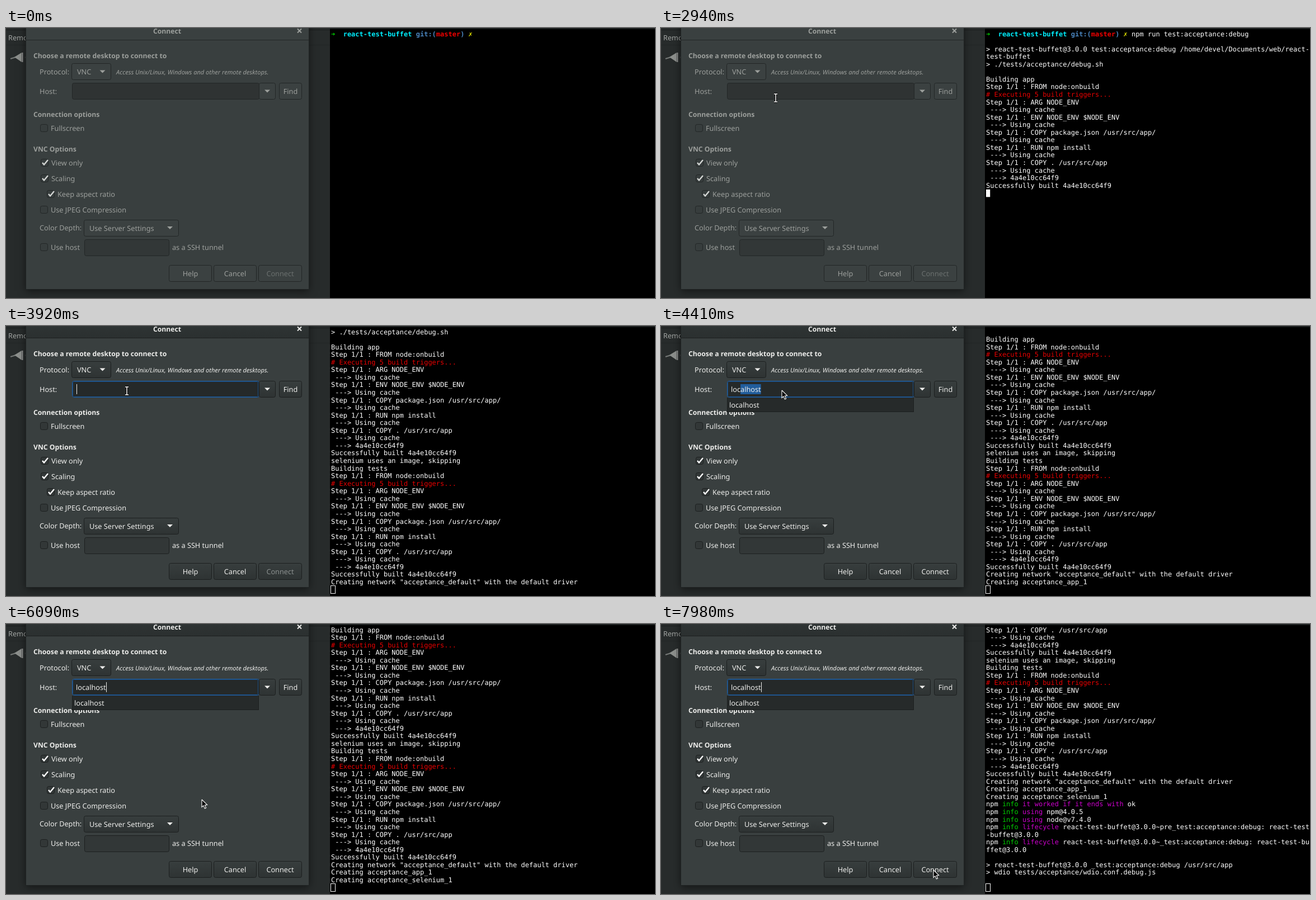
An HTML page with a canvas for the animation above (8 s loop, 1160 px wide and 483 px high).

```html
<!DOCTYPE html>
<html lang="en">
<head>
<meta charset="utf-8">
<title>Remote desktop debugging</title>
<style>
  html, body { margin: 0; width: 100%; height: 100%; overflow: hidden; background: #000; }
  canvas { display: block; }
</style>
</head>
<body>
<canvas id="stage" width="1160" height="483"></canvas>
<script>
const ctx = document.getElementById("stage").getContext("2d");
ctx.textRendering = "geometricPrecision";

const LOOP = 8000, TICK = 70;
const UI = "12.7px 'Noto Sans', sans-serif";
const UI_BOLD = "bold 12.2px 'Noto Sans', sans-serif";
const UI_ITALIC = "italic 11px 'Noto Sans', sans-serif";
const MONO = "12px 'DejaVu Sans Mono', monospace";

// Piecewise linear value over time; keys are [time, value].
function track(t, keys) {
  let i = 0;
  while (i < keys.length - 2 && t >= keys[i + 1][0]) i++;
  const [t0, a] = keys[i], [t1, b] = keys[i + 1];
  return a + (b - a) * Math.min(1, Math.max(0, (t - t0) / (t1 - t0)));
}
const between = (t, a, b) => t >= a && t < b;

// ---------- Terminal ----------
const CELL = 7.224, ROW = 13.56, LEFT = 581, TOP = 4, LAST_ROW = 34;
// A section sign plus a letter switches colour; capitals are bold.
const INK = { w: "#fff", g: "#00cd00", m: "#cd00cd", r: "#e80000", d: "#555",
              G: "#00cd00", C: "#00f0ff", B: "#4a86c0", R: "#f00000", Y: "#e8e800" };

const PROMPT = "§G➜  §Creact-test-buffet §Bgit:(§Rmaster§B) §Y✗ §w";
const COMMAND = "npm run test:acceptance:debug";
const progress = node => `[§d${".".repeat(18)}§w] - : §ginfo §musing §wnode@${node}`;
const cached = step => ["Step 1/1 : " + step, " ---> Using cache"];
const BUILD = [
  "Step 1/1 : FROM node:onbuild",
  "§r# Executing 5 build triggers...",
  ...["ARG NODE_ENV", "ENV NODE_ENV $NODE_ENV", "COPY package.json /usr/src/app/",
      "RUN npm install", "COPY . /usr/src/app"].flatMap(cached),
  " ---> 4a4e10cc64f9",
  "Successfully built 4a4e10cc64f9"
];
const LINES = [
  PROMPT + COMMAND,
  "",
  "> react-test-buffet@3.0.0 test:acceptance:debug /home/devel/Documents/web/react-",
  "test-buffet",
  "> ./tests/acceptance/debug.sh",
  "",
  "Building app", ...BUILD,
  "selenium uses an image, skipping",
  "Building tests", ...BUILD,
  'Creating network "acceptance_default" with the default driver',
  "Creating acceptance_app_1",
  "Creating acceptance_selenium_1",
  "npm §ginfo §mit worked if it ends with §wok",
  "npm §ginfo §musing §wnpm@4.0.5",
  "npm §ginfo §musing §wnode@v7.4.0",
  "npm §ginfo §mlifecycle §wreact-test-buffet@3.0.0~pre_test:acceptance:debug: react-test",
  "-buffet@3.0.0",
  "npm §ginfo §mlifecycle §wreact-test-buffet@3.0.0~_test:acceptance:debug: react-test-bu",
  "ffet@3.0.0",
  "",
  "> react-test-buffet@3.0.0 _test:acceptance:debug /usr/src/app",
  "> wdio tests/acceptance/wdio.conf.debug.js",
  ""
];
const LINE_COUNT = [
  [0, 1], [1960, 1], [2030, 6], [2240, 6], [3010, 22], [3220, 22], [3570, 37],
  [3850, 37], [3920, 38], [3990, 38], [4060, 39], [4480, 39], [4550, 40],
  [6580, 40], [6650, 43], [7210, 43], [7280, 47], [7350, 51]
];

function drawLine(line, row) {
  let col = 0;
  ("w" + line).split("§").filter(part => part.length > 1).forEach(part => {
    const code = part[0];
    ctx.fillStyle = INK[code];
    ctx.font = (code < "a" ? "bold " : "") + MONO;
    for (const char of part.slice(1)) {
      if (char !== " ") ctx.fillText(char, LEFT + col * CELL, TOP + 10.5 + row * ROW);
      col++;
    }
  });
}

function drawTerminal(t) {
  ctx.fillStyle = "#000";
  ctx.fillRect(579, 0, 581, 483);
  ctx.fillStyle = "#1d2020";
  ctx.fillRect(579, 0, 581, 2);

  const count = Math.round(track(t, LINE_COUNT));
  const scroll = Math.max(0, count - LAST_ROW);
  for (let i = scroll; i < count; i++) drawLine(t < 350 ? PROMPT : LINES[i], i - scroll);

  const loading = between(t, 1960, 2030) ? "v6.6.0" : between(t, 7210, 7280) ? "v7.4.0" : "";
  if (loading) return drawLine(progress(loading), count - scroll);
  if (t < 350 || between(t, 980, 1470)) return;

  const typing = t < 1470;
  const x = LEFT + (typing ? 65 * CELL : 0);
  const y = TOP + (typing ? 0 : count - scroll) * ROW;
  ctx.fillStyle = ctx.strokeStyle = "#fff";
  ctx.lineWidth = 1;
  if (t < 3290) ctx.fillRect(x, y, CELL, ROW);
  else ctx.strokeRect(x - 0.5, Math.round(y) - 0.5, 8, 14);
}

// ---------- Dialog ----------
const HOST = "localhost";
const KEY_TIMES = [4200, 4270, 4410, 4550, 4690, 5040, 5110, 5320, 5740];
let focus = 0;

// Blend from the unfocused colour to the focused one.
function tone(dim, lit, k = focus) {
  return `rgb(${dim.map((v, i) => Math.round(v + (lit[i] - v) * k))})`;
}
const TEXT_DIM = [156, 159, 156], TEXT_LIT = [238, 238, 236];
const textTone = () => tone(TEXT_DIM, TEXT_LIT);
const borderTone = () => tone([34, 38, 38], [28, 31, 31]);

function label(text, x, y, font = UI, color = textTone(), align = "left") {
  ctx.font = font;
  ctx.fillStyle = color;
  ctx.textAlign = align;
  ctx.fillText(text, x, y + 4.5);
  ctx.textAlign = "left";
}

function box(x, y, w, h, fill, stroke, radius = 3) {
  ctx.beginPath();
  ctx.roundRect(x + 0.5, y + 0.5, w - 1, h - 1, radius);
  ctx.fillStyle = fill;
  ctx.fill();
  ctx.lineWidth = 1;
  ctx.strokeStyle = stroke;
  ctx.stroke();
}

function polyline(points, color, width) {
  ctx.beginPath();
  points.forEach(([x, y]) => ctx.lineTo(x, y));
  ctx.strokeStyle = color;
  ctx.lineWidth = width;
  ctx.stroke();
}

function polygon(points, color) {
  ctx.beginPath();
  points.forEach(([x, y]) => ctx.lineTo(x, y));
  ctx.closePath();
  ctx.fillStyle = color;
  ctx.fill();
}

function vertical(y0, y1, from, to) {
  const g = ctx.createLinearGradient(0, y0, 0, y1);
  g.addColorStop(0, from);
  g.addColorStop(1, to);
  return g;
}

function button(x, y, w, h, text = "", color, textX = x + w / 2, align = "center") {
  const fill = vertical(y, y + h, tone([59, 65, 65], [56, 62, 62]), tone([59, 65, 65], [46, 51, 51]));
  box(x, y, w, h, fill, borderTone());
  label(text, textX, y + h / 2, UI, color, align);
}

function dropArrow(x, y) {
  polygon([[x - 5, y - 2.5], [x + 5, y - 2.5], [x, y + 2.5]], textTone());
}

function checkbox(x, y, text, checked) {
  box(x, y - 7, 14, 14, tone([55, 61, 61], [50, 55, 55]), borderTone());
  if (checked) polyline([[x + 3, y], [x + 6, y + 3.5], [x + 13, y - 5]], tone([212, 214, 212], [255, 255, 255]), 2.4);
  label(text, x + 19, y);
}

function drawBackdrop() {
  ctx.fillStyle = "#272b2b";
  ctx.fillRect(0, 0, 579, 483);
  ctx.fillStyle = "#1b1e1e";
  ctx.fillRect(0, 3, 579, 1);
  ctx.fillStyle = "#222626";
  ctx.fillRect(0, 30, 579, 1);
  label("Remote Desktop", 4, 17, UI, "#a2a5a3");
  polyline([[8, 55], [18, 52]], "#777a78", 2);
  polygon([[15, 52], [28, 44], [28, 61]], "#8c8f8c");
  polyline([[29.5, 44], [29.5, 61]], "#b0b2b0", 1.5);
  label("c", 34, 51, UI, "#8f9290");
}

function drawEntry(t) {
  const typed = KEY_TIMES.filter(time => t >= time).length;
  const active = focus > 0;
  box(118, 98, 335, 30, tone([47, 51, 51], [37, 41, 41]), tone([34, 38, 38], [33, 93, 156]));
  if (active) {
    ctx.globalAlpha = focus;
    box(119, 99, 332, 28, "#252929", "#1d4d80", 2);
    ctx.globalAlpha = 1;
  }
  button(452, 98, 30, 30);
  dropArrow(467, 113);

  ctx.font = UI;
  const xAt = n => 125 + ctx.measureText(HOST.slice(0, n)).width;
  if (typed) {
    if (typed < HOST.length) {
      ctx.fillStyle = "#215d9c";
      ctx.fillRect(xAt(typed), 104, xAt(HOST.length) - xAt(typed), 18);
    }
    label(HOST, 125, 113);
  }
  const caretOn = between(t, 3360, 4200) ||
    (typed === HOST.length && !between(t, 6370, 6790) && !between(t, 7560, 7980));
  if (caretOn) {
    ctx.fillStyle = "#eeeeec";
    ctx.fillRect(typed ? Math.round(xAt(typed)) : 126, 104, 1, 18);
  }
}

function drawPopup(t, pointer) {
  if (t < 4270) return;
  ctx.fillStyle = "#1c1f1f";
  ctx.fillRect(118, 128, 334, 26);
  ctx.fillStyle = t > 5740 && between(pointer.y, 128, 154) ? "#215d9c" : "#262a2a";
  ctx.fillRect(119, 128, 332, 25);
  label(HOST, 122, 141);
}

function drawDialog(t, pointer) {
  ctx.save();
  ctx.shadowColor = "rgba(0,0,0,.55)";
  ctx.shadowBlur = 14;
  ctx.shadowOffsetY = 3;
  ctx.fillStyle = "#393f3f";
  ctx.fillRect(36, -20, 505, 487);
  ctx.restore();
  ctx.fillStyle = vertical(-20, 21, tone([58, 64, 64], [49, 55, 55]), tone([58, 64, 64], [43, 48, 48]));
  ctx.fillRect(36, 0, 505, 21);
  ctx.fillStyle = borderTone();
  ctx.fillRect(36, 21, 505, 1);
  ctx.lineWidth = 1;
  ctx.strokeStyle = "#1f2323";
  ctx.strokeRect(35.5, -20, 506, 487.5);

  label("Connect", 288, 5, UI_BOLD, textTone(), "center");
  polyline([[521, 1.5], [528, 8.5]], textTone(), 2);
  polyline([[528, 1.5], [521, 8.5]], textTone(), 2);

  label("Choose a remote desktop to connect to", 49, 49, UI_BOLD);
  label("Protocol:", 60, 78);
  button(117, 63, 71, 30, "VNC", textTone(), 127, "left");
  dropArrow(172.5, 78);
  label("Access Unix/Linux, Windows and other remote desktops.", 197, 78, UI_ITALIC);
  label("Host:", 60, 113);
  drawEntry(t);
  button(488, 98, 41, 30, "Find");

  label("Connection options", 49, 154, UI_BOLD);
  checkbox(61, 179, "Fullscreen");

  label("VNC Options", 49, 216, UI_BOLD);
  checkbox(62, 241, "View only", true);
  checkbox(62, 269, "Scaling", true);
  checkbox(73, 297, "Keep aspect ratio", true);
  checkbox(61, 325, "Use JPEG Compression");
  label("Color Depth:", 60, 357);
  button(139, 343, 170, 30, "Use Server Settings", textTone(), 149, "left");
  dropArrow(293, 357.5);
  checkbox(61, 392, "Use host");
  box(140, 378, 152, 30, tone([50, 55, 55], [50, 55, 55]), borderTone());
  label("as a SSH tunnel", 297, 392);

  button(291, 424, 77, 30, "Help");
  button(371, 424, 77, 30, "Cancel");
  const enabled = track(t, [[4130, 0], [4410, 1]]);
  const disabledTone = [107, 112, 111].map(v => v + 32 * focus);
  button(451, 424, 78, 30, "Connect", tone(disabledTone, TEXT_LIT, enabled));
  drawPopup(t, pointer);
}

// ---------- Mouse pointer ----------
const POINTER_X = [[2310, 104], [3010, 216], [5740, 216], [5810, 223], [6090, 350], [6510, 459], [6720, 487]];
const POINTER_Y = [[2310, 200], [3010, 115], [5740, 115], [5810, 140], [6090, 314], [6510, 419], [6720, 440]];

function drawPointer(t, { x, y }) {
  if (t < 2310 || between(t, 4060, 4270)) return;
  ctx.save();
  ctx.translate(Math.round(x), Math.round(y));
  if (t < 4060 && x > 118 && between(y, 98, 128)) {
    for (const [color, width] of [["#000", 3.5], ["#fff", 1.5]]) {
      polyline([[-3, -6], [3, -6]], color, width);
      polyline([[0, -6], [0, 8]], color, width);
      polyline([[-3, 8], [3, 8]], color, width);
    }
  } else {
    const shape = [[0, 0], [0, 13.5], [3, 10.8], [5.3, 16], [7.6, 15], [5.4, 10], [9.6, 9.6]];
    polygon(shape, "#000");
    polyline([...shape, shape[0]], "#fff", 1.1);
  }
  ctx.restore();
}

function draw(t) {
  const pointer = { x: track(t, POINTER_X), y: track(t, POINTER_Y) };
  focus = track(t, [[3220, 0], [3500, 1]]);
  drawBackdrop();
  drawDialog(t, pointer);
  drawTerminal(t);
  drawPointer(t, pointer);
}

let lastTick = -1;
function animate() {
  const tick = Math.floor(performance.now() % LOOP / TICK);
  if (tick !== lastTick) draw(tick * TICK);
  lastTick = tick;
  requestAnimationFrame(animate);
}
animate();
</script>
</body>
</html>
```
